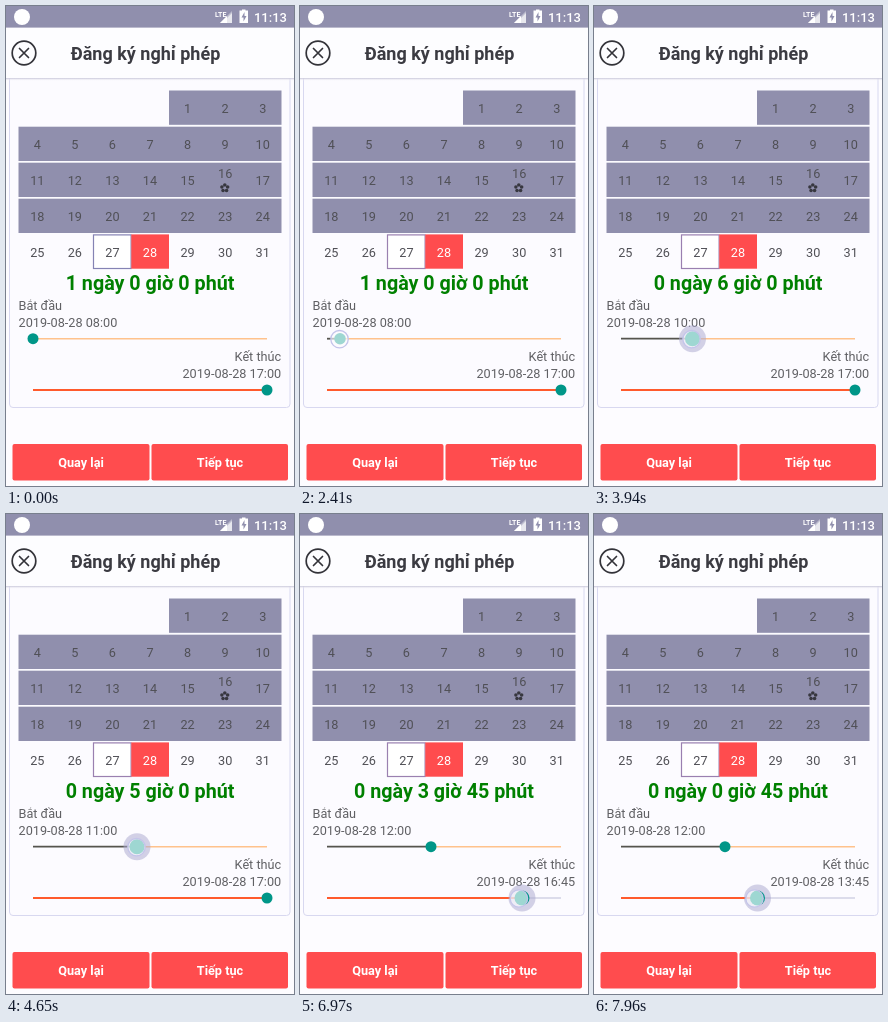
These frames come from a looping animation (288x480 px, 8000 ms). An HTML page:

```html
<!DOCTYPE html>
<html lang="vi">
<head>
<meta charset="utf-8">
<title>Đăng ký nghỉ phép</title>
<style>
  html, body { margin: 0; width: 100%; height: 100%; overflow: hidden; background: #fdfcff; }
  svg { display: block; width: 288px; height: 480px; font: 12.7px Roboto, "Noto Sans", sans-serif; }
  .mid { text-anchor: middle; }
  .end { text-anchor: end; }
  .bold { font-weight: 700; }
  .label { fill: #606064; }
</style>
</head>
<body>
<svg viewBox="0 0 288 480">
  <rect width="288" height="480" fill="#fdfcff"/>
  <path d="M3.500 72V398Q3.500 401.500 7 401.500H280.500Q284 401.500 284 398V72" fill="#fcfbff" stroke="#d8d8f0"/>

  <!-- header -->
  <defs>
    <linearGradient id="shade" x2="0" y2="1">
      <stop stop-color="#c6c5d8"/>
      <stop offset="1" stop-color="#fdfcff" stop-opacity="0"/>
    </linearGradient>
  </defs>
  <rect y="72" width="288" height="3" fill="url(#shade)"/>
  <rect y="21" width="288" height="51" fill="#fdfdff"/>
  <g fill="none" stroke="#333339" stroke-width="1.700" stroke-linecap="round">
    <circle cx="18" cy="47" r="11.800"/>
    <path d="M13.500 42.500l9 9m0-9l-9 9"/>
  </g>
  <text x="139.500" y="54" class="mid bold" font-size="18" fill="#3b3b42">Đăng ký nghỉ phép</text>

  <!-- status bar -->
  <rect width="288" height="21.600" fill="#908fad"/>
  <g fill="#fff">
    <circle cx="16" cy="11" r="8"/>
    <text x="209" y="11" font-size="7" class="bold">LTE</text>
    <path d="M226 17V5L214 17Z" opacity=".4"/>
    <path d="M221 17V10L214 17Z"/>
    <path d="M226 17H216L226 7Z" opacity=".65"/>
    <path d="M236 4.500V3.500H239.500V4.500H242V17H233.500V4.500Z"/>
    <text x="281" y="15.500" class="end" font-size="13" font-weight="500">11:13</text>
  </g>
  <path d="M238.500 6L235.500 11.500H237.500V15.500L240.500 10H238.500Z" fill="#908fad"/>

  <g id="calendar"></g>

  <text id="total" x="144" y="284" class="mid bold" font-size="19.700" fill="#008000"></text>
  <g class="label">
    <text x="12.500" y="303.500">Bắt đầu</text>
    <text id="startText" x="12.500" y="321"></text>
    <text x="275.200" y="355" class="end">Kết thúc</text>
    <text id="endText" x="275.200" y="372" class="end"></text>
  </g>
  <g id="sliders"></g>

  <g fill="#ff4c4e">
    <rect x="6.500" y="438" width="137" height="36.500" rx="2"/>
    <rect x="145.500" y="438" width="136.500" height="36.500" rx="2"/>
  </g>
  <g class="mid bold" fill="#fff">
    <text x="75" y="461">Quay lại</text>
    <text x="214" y="461">Tiếp tục</text>
  </g>
</svg>
<script>
const LOOP = 8000, LEFT = 27, RIGHT = 261, STEP = 6.5;
const byId = id => document.getElementById(id);

function add(parent, tag, attrs, text) {
  const el = document.createElementNS("http://www.w3.org/2000/svg", tag);
  set(el, attrs);
  if (text !== undefined) el.textContent = text;
  parent.append(el);
  return el;
}
function set(el, attrs) {
  for (const key in attrs) el.setAttribute(key, attrs[key]);
}
const clamp = v => Math.max(0, Math.min(1, v));

// Piecewise linear value through [time, value] points
function along(points, t) {
  if (t <= points[0][0]) return points[0][1];
  for (let i = 1; i < points.length; i++) {
    const [t0, a] = points[i - 1], [t1, b] = points[i];
    if (t < t1) return a + (b - a) * (t - t0) / (t1 - t0);
  }
  return points[points.length - 1][1];
}

function buildCalendar() {
  const g = byId("calendar"), width = 37.57;
  [[163, 84.5], [12.5, 120.7], [12.5, 156.7], [12.5, 192.7]].forEach(([x, y]) =>
    add(g, "rect", { x, y, width: 275.5 - x, height: 34.3, fill: "#908fad" }));
  const frame = add(g, "rect", { x: 87.5, y: 228.9, width: 37.6, height: 33.6, fill: "#fff", "stroke-width": 1.2 });
  add(g, "rect", { x: 125.3, y: 228.4, width: 37.7, height: 34.3, fill: "#ff4c4e" });
  for (let day = 1; day <= 31; day++) {
    const cell = day + 3, row = Math.floor(cell / 7);
    const x = 12.5 + width * (cell % 7 + 0.5);
    const y = 106.6 + row * 36 - (day === 16 ? 7 : 0);
    add(g, "text", { x, y, class: "mid", fill: day === 28 ? "#fff" : "#505056" }, day);
  }
  for (let i = 0; i < 5; i++) {
    const a = i * Math.PI * 0.4 - Math.PI / 2;
    add(g, "circle", { cx: 218.8 + 3 * Math.cos(a), cy: 182 + 3 * Math.sin(a), r: 1.8, fill: "#37373f" });
  }
  add(g, "circle", { cx: 218.8, cy: 182, r: 1.3, fill: "#908fad" });
  return frame;
}

function makeSlider(y, lower, upper) {
  const g = byId("sliders");
  const line = (stroke, width) => add(g, "line", { x1: LEFT, x2: RIGHT, y1: y, y2: y, stroke, "stroke-width": width });
  const rest = line(upper, 1.6), done = line(lower, 1.8);
  const halo = add(g, "circle", { cy: y, fill: "#aaa9cf" });
  const thumb = add(g, "circle", { cy: y, fill: "#009688" });
  const touch = add(g, "circle", { cy: y + 0.5, r: 8.7, fill: "#fff", "fill-opacity": 0.62,
    stroke: "#c4c4ea", "stroke-width": 1.3 });
  return (finger, t, down, up, offset) => {
    const x = LEFT + STEP * Math.round((finger - LEFT) / STEP);
    const pressed = t >= down && t < up;
    const grow = pressed ? clamp((t - down - 200) / 400) : 0;
    set(rest, { x1: x });
    set(done, { x2: x });
    set(halo, { cx: x, r: 8 + 5.5 * grow, opacity: 0.52 * grow });
    set(thumb, { cx: x, r: 5.5 + 2 * grow });
    set(touch, { cx: finger + offset, opacity: pressed ? 1 : 0 });
  };
}

const frame = buildCalendar();
const startSlider = makeSlider(332.7, "#55544e", "#ffc28c");
const endSlider = makeSlider(384, "#ff5a2c", "#d2d2e4");

const startDrag = [[2160, 27], [2410, 40], [2990, 57], [3940, 98], [4450, 131]];
const endDrag = [[6260, 261], [6970, 222], [7680, 163.5]];
// Labels trail the thumbs, in quarter hours
const startSteps = [[2420, 0], [4600, 12], [4800, 13], [5230, 14], [5640, 16]];
const endSteps = [[6870, 0], [6935, 1], [7667, 12], [7880, 13]];

const pad = n => String(n).padStart(2, "0");
const stamp = min => `2019-08-28 ${pad(Math.floor(min / 60))}:${pad(min % 60)}`;

function duration(from, to) {
  const lunch = Math.max(0, Math.min(to, 780) - Math.max(from, 720));
  const work = to - from - lunch, rest = work % 480;
  return `${Math.floor(work / 480)} ngày ${Math.floor(rest / 60)} giờ ${rest % 60} phút`;
}

function draw(t) {
  const from = 480 + 15 * Math.floor(along(startSteps, t) + 1e-6);
  const to = 1020 - 15 * Math.floor(along(endSteps, t) + 1e-6);
  byId("startText").textContent = stamp(from);
  byId("endText").textContent = stamp(to);
  byId("total").textContent = duration(from, to);
  startSlider(along(startDrag, t), t, 2160, 5060, -0.5);
  endSlider(along(endDrag, t), t, 6250, LOOP, -3);
  set(frame, { stroke: t < 1250 ? "#8583b4" : "#9a80b0" });
}

const began = performance.now();
function tick() {
  draw((performance.now() - began) % LOOP);
  requestAnimationFrame(tick);
}
tick();
</script>
</body>
</html>
```
